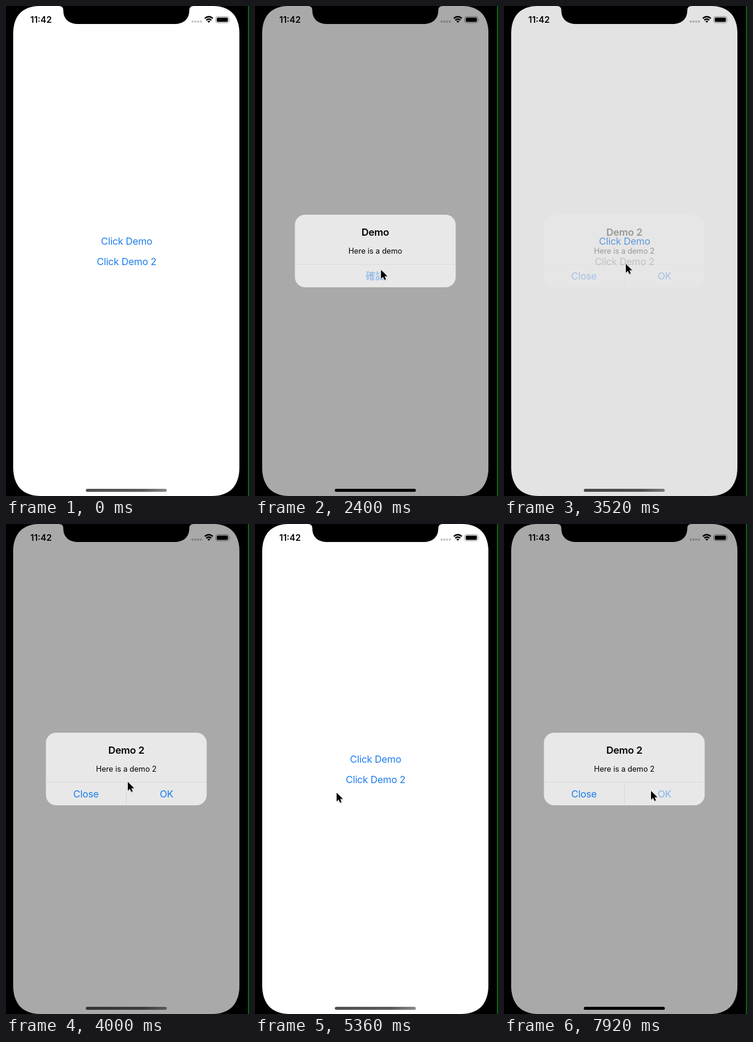
Recreate the animation shown at these times as an HTML page. Size 405x817 px, loop 8000 ms.

```html
<!DOCTYPE html>
<html lang="en">
<head>
<meta charset="utf-8">
<title>Alert demo</title>
<style>
  html, body { margin: 0; width: 100%; height: 100%; overflow: hidden; background: #000; }
  svg { display: block; width: 100%; height: 100%; }
  text { font-family: Inter, "Noto Sans CJK TC", "Noto Sans CJK", sans-serif; text-anchor: middle; }
  .link { font-size: 16.2px; letter-spacing: -.2px; fill: #1c7cee; }
  .title { font-size: 16.6px; letter-spacing: -.2px; font-weight: 600; }
  .note { font-size: 12.6px; }
  .clock { font-size: 14.6px; font-weight: 600; text-anchor: start; }
  #alert1, #alert2, #dim, #cursor, #indicatorDark, #late { opacity: 0; }
</style>
</head>
<body>
<svg viewBox="0 0 405 817" preserveAspectRatio="none">
  <defs>
    <clipPath id="screen"><path d="M12 46C12 16 28 0 56 0H345C373 0 389 16 389 46V769C389 800 373 817 343 817H58C28 817 12 800 12 769Z"/></clipPath>
    <linearGradient id="grey">
      <stop offset="0" stop-color="#505050"/><stop offset=".7" stop-color="#5a5a5a"/><stop offset="1" stop-color="#8a8a8a"/>
    </linearGradient>
    <g id="panel">
      <rect x="66.5" y="348" width="268" height="121" rx="17" fill="#e8e8e8"/>
      <path d="M66.5 430.5H334.5" stroke="#d8d8d8"/>
    </g>
  </defs>

  <rect width="405" height="817"/>
  <rect x="403.4" width="1.6" height="817" fill="#0a7a12"/>

  <g clip-path="url(#screen)">
    <rect width="405" height="817" fill="#fff"/>
    <text id="link1" class="link" x="201" y="398">Click Demo</text>
    <text id="link2" class="link" x="201" y="432">Click Demo 2</text>
    <g fill="#c6c6c6">
      <circle cx="311" cy="26" r="1.9"/><circle cx="315.6" cy="26" r="1.9"/>
      <circle cx="320.2" cy="26" r="1.9"/><circle cx="324.8" cy="26" r="1.9"/>
    </g>
    <rect x="349.5" y="17.5" width="22" height="10.5" rx="3" fill="none" stroke="#999"/>
    <path d="M373 21.2q1.6 1.5 0 3.2z" fill="#999"/>
    <rect x="133" y="805" width="135" height="5" rx="2.5" fill="url(#grey)"/>
    <rect id="dim" width="405" height="817"/>

    <g id="early"><text class="clock" x="40.5" y="28">11:42</text></g>
    <g id="late"><text class="clock" x="40.5" y="28">11:43</text></g>
    <g fill="none" stroke="#000" stroke-width="2.3">
      <path d="M331.3 20.7Q338 14.8 344.7 20.7M333.8 23.6Q338 19.8 342.2 23.6"/>
      <path d="M335.6 25.4Q338 23.4 340.4 25.4L338 28Z" fill="#000" stroke="none"/>
    </g>
    <rect x="351.2" y="19.2" width="18.6" height="7.2" rx="1.6"/>
    <rect id="indicatorDark" x="133" y="805" width="135" height="5" rx="2.5"/>
    <path d="M88 0Q95.5 0 95.5 7C95.5 22 105 30 121 30H280C296 30 305.500 22 305.500 7Q305.500 0 313 0Z"/>

    <g id="alert1">
      <use href="#panel"/>
      <text class="title" x="200.500" y="383">Demo</text>
      <text class="note" x="200.500" y="413">Here is a demo</text>
      <text id="confirm" class="link" x="200.500" y="456">確認</text>
    </g>
    <g id="alert2">
      <use href="#panel"/>
      <path d="M200.500 430V469" stroke="#d8d8d8"/>
      <text class="title" x="200.500" y="383">Demo 2</text>
      <text class="note" x="200.500" y="413">Here is a demo 2</text>
      <text class="link" id="close" x="133.300" y="456">Close</text>
      <text class="link" id="ok" x="267.600" y="456">OK</text>
    </g>
  </g>

  <g id="cursor">
    <path d="M0 0V14.600L3.400 11.500L5.700 16.700L8.200 15.600L5.900 10.500H10.600Z" transform="translate(.6 1.300)" opacity=".25"/>
    <path d="M0 0V14.600L3.400 11.500L5.700 16.700L8.200 15.600L5.900 10.500H10.600Z" stroke="#fff" stroke-width="1" paint-order="stroke"/>
  </g>
</svg>
<script>
const LOOP = 8000, TICK = 80;
const $ = id => document.getElementById(id);

// Rows are [time, value, moving]; a moving row glides to the next one in ticks.
function track(id, prop, rows) {
  const frames = rows.map(([time, value, moving], i) => ({
    offset: time / LOOP,
    [prop]: value,
    easing: `steps(${moving ? (rows[i + 1][0] - time) / TICK : 1}, end)`
  }));
  frames.push({ offset: 1, [prop]: rows[rows.length - 1][1] });
  $(id).animate(frames, { duration: LOOP, iterations: Infinity });
}

const fade = (start, levels) => levels.map((level, i) => [start + i * TICK, level]);
const appear = [.33, .6, .78, .9, .97, 1];
const vanish = [.6, .2, 0];

const first = [...fade(1360, appear), ...fade(2560, vanish)];
const second = [
  ...fade(3520, appear), ...fade(4960, vanish),
  ...fade(6160, [.2, .5, .745, .88, .96, 1])
];
track("alert1", "opacity", [[0, 0], ...first]);
track("alert2", "opacity", [[0, 0], ...second]);
track("dim", "opacity", [[0, 0], ...[...first, ...second].map(([t, p]) => [t, p * .337])]);

const BLUE = "#1c7cee", PRESSED = "#c2c2c2";
track("link1", "fill", [[0, BLUE], [1280, PRESSED], [2560, BLUE]]);
track("link2", "fill", [[0, BLUE], [3360, PRESSED], [4960, BLUE], [6080, PRESSED]]);
track("confirm", "opacity", [[0, 1], [2400, .5], [2720, 1]]);
track("close", "opacity", [[0, 1], [4720, .5], [5120, 1]]);
track("ok", "opacity", [[0, 1], [7920, .5]]);
track("indicatorDark", "opacity", [[0, 0], [1360, 1], [2640, 0], [4400, 1], [5040, 0], [6240, 1]]);
track("early", "opacity", [[0, 1], [5840, 0]]);
track("late", "opacity", [[0, 0], [5840, 1]]);

const path = [
  [0, 393, 440], [160, 393, 440, 1], [480, 270, 405, 1], [800, 217, 392],
  [1840, 217, 392, 1], [2320, 210, 440],
  [2720, 210, 440, 1], [3120, 203, 430],
  [4160, 203, 430, 1], [4640, 136, 448],
  [5360, 136, 448, 1], [5760, 185, 432],
  [5840, 185, 432, 1], [6080, 195, 427],
  [6800, 195, 427, 1], [7280, 245, 445]
];
track("cursor", "transform", path.map(([t, x, y, moving]) => [t, `translate(${x}px, ${y}px)`, moving]));
track("cursor", "opacity", [[0, 0], [160, 1]]);
</script>
</body>
</html>
```
